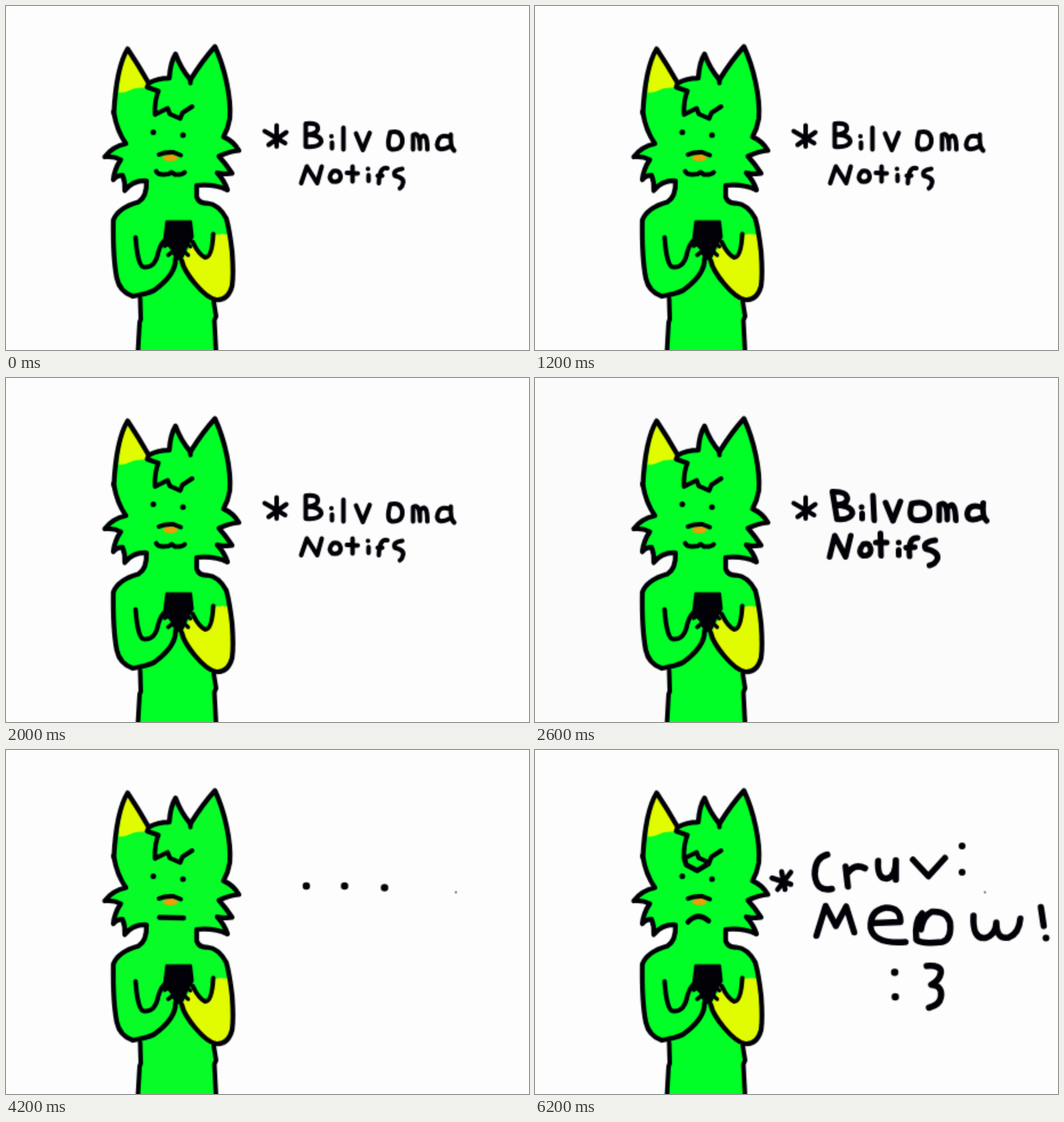
An HTML page with a canvas that plays this animation: 916x602 px, repeating every 8 s.

```html
<!DOCTYPE html>
<html lang="en">
<head>
<meta charset="utf-8">
<title>Checking messages</title>
<style>
html, body { margin: 0; width: 100%; height: 100%; overflow: hidden; background: #fdfdfd; }
canvas { display: block; width: 916px; height: 602px; }
</style>
</head>
<body>
<canvas id="stage" width="458" height="301"></canvas>
<script>
const ctx = document.getElementById('stage').getContext('2d');
const LOOP = 8000, BEAT = 200;
const INK = '#020107', YELLOW = '#e1fc00', ORANGE = '#eb9f0a';

// Half resolution, scaled up, gives the soft brush edges.
ctx.scale(0.5, 0.5);
ctx.lineCap = ctx.lineJoin = 'round';

function stroke(path, width = 8) {
  ctx.strokeStyle = INK;
  ctx.lineWidth = width;
  ctx.stroke(new Path2D(path));
}

function fill(path, color) {
  ctx.fillStyle = color;
  ctx.fill(new Path2D(path));
}

function dot(x, y, r = 5, color = INK, ry = r) {
  ctx.fillStyle = color;
  ctx.beginPath();
  ctx.ellipse(x, y, r, ry, 0, 0, 7);
  ctx.fill();
}

// Cat
const outline = `M297 442 Q298 470 259 498 Q247 504 222 508 Q199 500 194 476
  Q187 440 188 375 Q196 353 232 343 Q247 334 246 306
  Q222 305 208 323 Q209 308 204 296 Q194 296 188 304 Q190 285 201 269
  Q188 262 173 264 Q186 246 210 241 Q194 218 189 187 Q193 108 213 75
  Q231 102 250 135 Q265 126 286 126 Q288 98 297 84 Q306 109 323 129
  Q345 94 366 71 C383 108 395 160 392 197 Q389 215 381 229
  Q398 236 408 253 Q392 254 373 263 Q385 276 396 293 Q386 295 370 292
  Q383 306 388 322 Q365 311 334 314 V334 Q338 346 352 345
  Q373 347 386 372 Q392 394 396 430 Q399 470 396 490
  Q389 516 368 514 C346 510 312 466 308 446`;
const torso = 'M297 442 L234 508 L235 550 L231 610 H368 L366 543 L364 515 L308 446Z';
const earTip = 'M213 75 Q231 102 250 135 L243 143 Q226 142 218 147 Q206 153 197 151 Q202 96 213 75Z';
const sleeve = `M364 401 Q377 397 391 401 Q394 415 396 430 Q399 470 396 490
  Q389 516 368 514 C346 510 312 466 308 446 L326 415 Q340 440 349 440 Q361 438 364 401Z`;
const phone = 'M281 377 H324 L327 404 L317 420 L307 443 H298 L290 425 L277 410Z';
const mouths = {
  smile: ['M263 289 Q266 297 285 294 L290 291 L296 295 Q309 296 313 291', 8],
  flat: ['M269 293 L311 294', 9],
  frown: ['M268 301 Q285 283 304 299', 9]
};

function drawCat(mood, green) {
  fill(torso, green);
  fill(outline, green);
  fill(earTip, YELLOW);
  fill(sleeve, YELLOW);
  stroke('M235 512 L236 548 L234 554 L231 606 M364 518 L368 543 L365 550 L368 606');
  stroke(outline, 8.5);
  stroke('M323 129 V135 M188 185 L190 192');
  stroke('M250 135 L247 142 L267 149 Q260 165 261 190 L283 179 L287 189 L305 197 L309 187 L326 176');
  stroke('M227 405 Q231 459 243 457 Q262 458 267 430 Q272 413 281 408');
  stroke('M363 399 Q361 440 349 440 Q338 436 327 413');
  fill(phone, INK);
  stroke(phone, 4);
  stroke('M278 420 L291 412 M284 436 L298 425 M323 421 L312 412 M319 436 L308 426', 7);
  dot(258, 221);
  dot(310, 226);
  dot(288, 266, 13, ORANGE, 6);
  stroke('M268 260 Q279 255 293 256 L306 261');
  stroke(...mouths[mood]);
  if (mood === 'frown') stroke('M262 191 L265 201 L284 211 L304 199', 9);
}

// Handwriting
const bigStar = 'M474 209 V246 M453 219 L489 240 M491 221 L460 243';

function noticeThin() {
  stroke(bigStar);
  stroke('M525 206 V246 M525 206 Q548 203 546 216 Q544 224 527 225 Q553 226 552 238 Q548 248 525 246');
  stroke('M571 239 V249 M591 213 V251 M613 223 L625 252 L637 222');
  dot(570, 228, 4);
  stroke('M673 221 Q665 249 676 251 Q696 252 694 232 Q690 216 673 221');
  stroke('M713 251 V226 Q725 218 725 250 V232 Q738 216 738 251');
  stroke('M778 230 Q758 221 755 243 Q757 257 779 245 M779 225 Q778 248 785 253');
  stroke('M517 310 L527 281 L545 310 L553 281');
  stroke('M573 289 Q562 300 572 307 Q587 309 586 297 Q584 286 573 289');
  stroke('M607 281 V307 M597 292 L616 293 M635 296 V306');
  dot(634, 285, 4);
  stroke('M668 284 Q654 280 653 310 M651 297 H659');
  stroke('M694 285 Q677 287 681 297 Q699 301 695 311 Q694 317 690 319');
}

function noticeBold() {
  stroke(bigStar);
  stroke('M521 199 L529 247 M521 199 Q547 198 547 212 Q545 222 527 222 Q556 224 556 237 Q552 249 529 247', 10);
  stroke('M573 237 V246 M592 206 L594 249 M614 218 L627 250 L640 216', 10);
  dot(572, 226);
  stroke('M660 220 Q652 248 668 249 Q693 250 691 232 Q688 213 660 220', 10);
  stroke('M708 249 V222 Q723 212 722 248 V228 Q736 210 737 249', 10);
  stroke('M784 227 Q759 218 757 238 Q758 255 784 243 M785 219 Q783 244 791 250', 10);
  stroke('M516 313 L525 276 L544 313 L553 276', 10);
  stroke('M575 291 Q564 304 574 311 Q589 312 588 299 Q586 287 575 291', 10);
  stroke('M605 272 L606 311 M597 288 L616 288 M637 301 V310', 10);
  dot(637, 288);
  stroke('M670 280 Q653 278 656 312 M650 297 L665 296', 10);
  stroke('M701 284 Q678 287 684 299 Q707 304 705 316 Q702 325 691 328', 10);
}

function sender() {
  stroke('M415 224 L448 235 M448 214 L425 244 M432 213 L438 244', 9);
  stroke('M512 183 Q490 188 490 218 Q493 249 520 243', 11);
  stroke('M544 204 L548 239 M547 216 Q560 197 578 207', 11);
  stroke('M601 194 Q599 226 616 225 Q632 222 632 193 V227', 11);
  stroke('M662 192 L689 221 L718 189', 11);
  dot(748, 168, 6);
  dot(748, 214, 6);
}

const greeting = [
  [5600, 'M493 325 L509 273 L527 308 L545 274 L559 319'],
  [5800, 'M590 303 L640 301 Q641 275 614 276 Q586 281 588 312 Q594 340 649 336'],
  [6000, 'M678 286 Q664 300 668 332 Q676 340 713 336 Q730 332 727 302 Q722 281 695 283 Q680 290 676 314 L672 300'],
  [6200, 'M768 290 Q766 331 788 329 Q807 324 808 302 Q808 333 830 328 Q848 321 850 295 M886 275 L891 308'],
  [6200, 'M686 378 Q711 376 711 389 Q709 403 694 411 Q714 412 711 432 Q709 446 690 451']
];

function drawWords(t) {
  if (t < 3200) {
    (t / BEAT | 0) % 2 ? noticeBold() : noticeThin();
    return;
  }
  dot(788, 249, 2, '#666');
  if (t < 5000) {
    dot(526, 238, 6.5);
    if (t >= 3800) dot(593, 238, 6.5);
    if (t >= 4200) dot(663, 241, 6.5);
    return;
  }
  sender();
  for (const [start, path] of greeting) if (t >= start) stroke(path, 11);
  if (t >= 6200) {
    dot(895, 329, 6);
    dot(630, 389, 6.5);
    dot(631, 432, 6.5);
  }
}

function render(now) {
  const t = now % LOOP;
  const mood = t < 3200 ? 'smile' : t < 5000 ? 'flat' : 'frown';
  ctx.fillStyle = t < 3200 && (t / BEAT | 0) % 2 ? '#fbfbfb' : '#fdfdfd';
  ctx.fillRect(0, 0, 916, 602);
  drawCat(mood, mood === 'flat' ? '#08fc28' : '#00ff26');
  drawWords(t);
}

const began = performance.now();
function tick() {
  render(performance.now() - began);
  requestAnimationFrame(tick);
}
tick();
</script>
</body>
</html>
```
